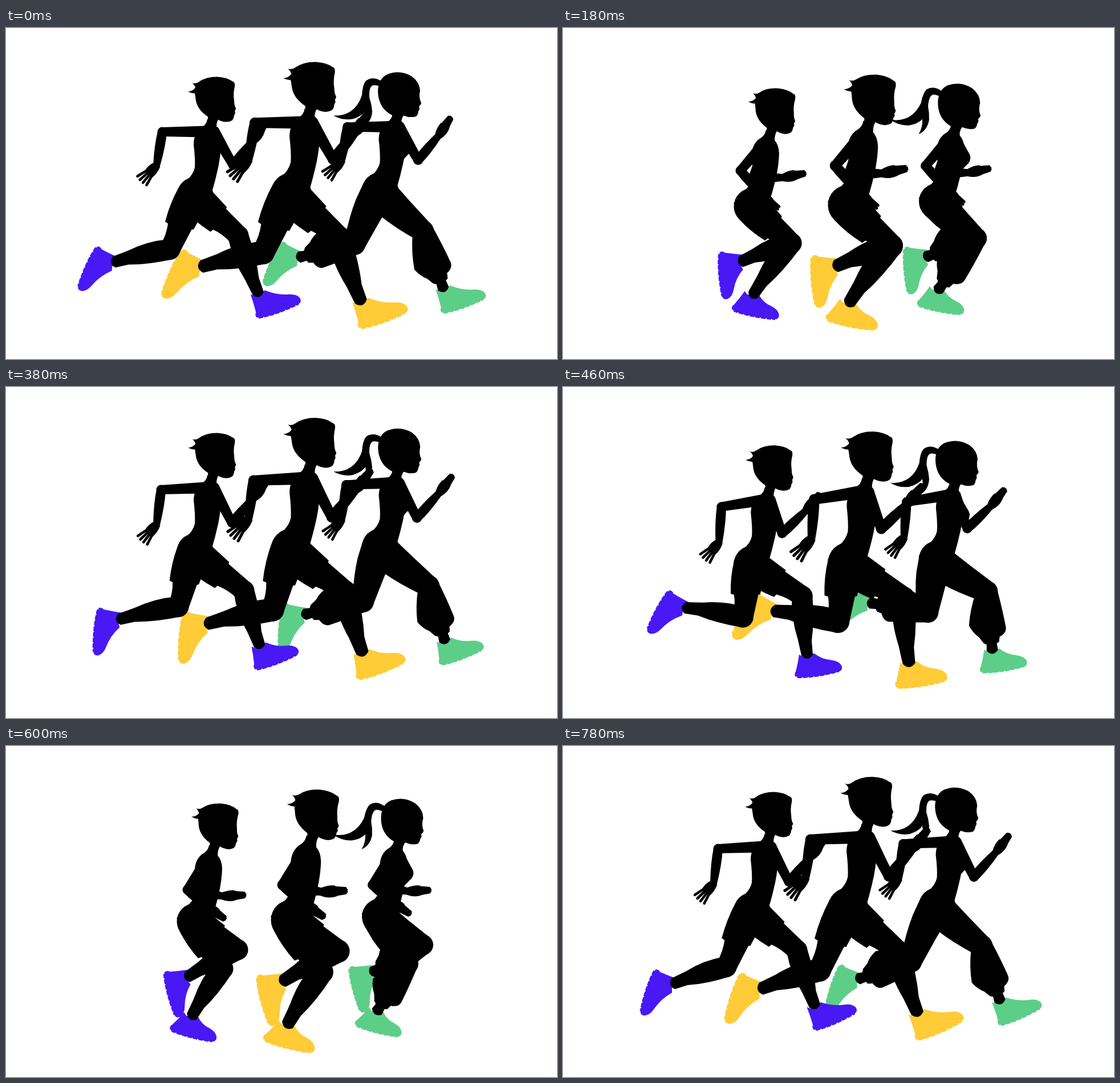
These frames come from a looping animation (966 px wide and 580 px high, 0.8 s). An HTML page with a canvas:

```html
<!DOCTYPE html>
<html lang="en">
<head>
<meta charset="utf-8">
<title>Runners</title>
<style>
html, body { margin: 0; width: 100%; height: 100%; overflow: hidden; background: #fff; }
canvas { display: block; width: 966px; height: 580px; }
</style>
</head>
<body>
<canvas id="stage" width="966" height="580"></canvas>
<script>
const ctx = document.getElementById('stage').getContext('2d');
const LOOP = 800, STEP = 20, TAU = Math.PI * 2;

// time, knee x y, ankle x y, foot angle, sole slide
const legA = [
  [0, 407, 364, 444, 470, -22, 13],
  [120, 418, 372, 402, 478, 0, 0],
  [180, 400, 377, 330, 472, 9, 1],
  [260, 325, 388, 250, 470, 25, 0],
  [380, 302, 385, 194, 408, 93, 12],
  [520, 338, 409, 238, 380, 119, 14],
  [600, 406, 357, 314, 407, 73, 10],
  [660, 413, 343, 384, 443, 26, 4],
  [780, 410, 358, 443, 460, -26, 12]
];
const legB = [
  [0, 287, 388, 185, 411, 112, 14],
  [120, 338, 409, 238, 380, 119, 14],
  [180, 400, 377, 308, 411, 83, 9],
  [260, 413, 343, 384, 443, 26, 4],
  [380, 417, 357, 446, 458, -23, 8],
  [400, 415, 362, 446, 469, -22, 9],
  [520, 418, 372, 402, 478, 0, 0],
  [600, 380, 390, 323, 478, 12, 0],
  [660, 325, 388, 250, 470, 25, 0],
  [780, 286, 387, 189, 418, 106, 13]
];
// time, elbow x y, wrist x y, fingertip x y
const armKeys = [
  [0, 274, 182, 264, 241, 236, 270],
  [120, 285, 237, 291, 300, 274, 331],
  [180, 311, 250, 348, 292, 378, 322],
  [200, 318, 252, 352, 282, 384, 303],
  [260, 352, 240, 412, 249, 452, 248],
  [380, 396, 238, 435, 194, 458, 164],
  [400, 398, 240, 434, 197, 456, 164],
  [520, 366, 270, 414, 238, 441, 217],
  [580, 333, 263, 387, 262, 427, 254],
  [600, 329, 256, 381, 263, 420, 261],
  [660, 290, 217, 327, 260, 358, 286],
  [780, 272, 180, 264, 241, 237, 271]
];

const shape = {
  head: new Path2D('M326 97Q333 99 338 95Q350 86 370 86Q388 87 397 94Q402 95 401 103Q398 115 400 128Q400 136 403 141Q403 144 401 146Q403 150 400 153Q400 158 397 162Q391 166 384 165Q376 164 372 161Q368 167 369 182L350 178Q355 165 354 156Q336 144 333 128Q332 121 331 115Q325 115 319 112Q328 111 332 105Q330 99 326 97Z'),
  girlHead: new Path2D('M652 112Q652 90 668 82Q690 73 711 85Q725 95 726 110Q723 122 728 132Q727 136 724 138Q726 143 723 146Q722 155 717 156Q707 158 697 154Q692 160 693 174L674 170Q679 162 678 154Q653 142 652 112Z'),
  tail: new Path2D('M659 94Q643 84 631 93Q625 100 624 118Q617 140 600 149Q588 155 574 154Q590 163 608 160Q624 155 630 146Q633 160 627 173Q641 165 642 146Q641 134 637 122Q636 104 643 101Q650 100 659 104Z'),
  torso: new Path2D('M353 160Q352 170 341 176Q329 186 329 205Q332 230 331 245Q328 258 316 268Q304 278 299 290L345 310L361 288Q367 268 372 245Q377 220 377 200Q376 185 369 178Q367 170 370 160Z'),
  bust: new Path2D('M369 178Q378 196 386 209Q391 217 385 226Q376 235 371 241L350 235L350 185Z'),
  thigh: new Path2D('M0-27L53-23L54-20L100-18L100 18Q80 16 62 22L61 28Q30 34 0 32Z'),
  pantThigh: new Path2D('M0-27L50-22L100-18L100 20Q60 30 30 32L0 32Z'),
  shin: new Path2D('M0 18Q36 23 75 14L105 10Q117 0 105-10L80-10Q45-18 0-18Z'),
  pantShin: new Path2D('M0 20Q30 33 58 37Q72 31 80 21L91 14L94 9L105 10Q117 0 105-10L93-9L91-13L82-15Q76-29 64-27Q35-24 0-18Z'),
  upperArm: new Path2D('M0-10L100-8Q109-6 109 0Q109 6 100 8L0 10Z'),
  forearm: new Path2D('M0-8Q40-10 100-6L100 6Q40 10 0 8Z'),
  palm: new Path2D('M-3-6Q10-11 21-9L23 8Q10 12-3 6Z')
};

// Smooth periodic curve through keyed rows
function sample(rows, time) {
  const n = rows.length, t = time % LOOP;
  let i = n - 1;
  while (rows[i][0] > t) i--;
  const row = k => rows[(k + n) % n];
  const when = k => row(k)[0] + Math.floor(k / n) * LOOP;
  const t0 = when(i - 1), t1 = when(i), t2 = when(i + 1), t3 = when(i + 2);
  const h = t2 - t1, u = (t - t1) / h, v = 1 - u;
  return row(i).slice(1).map((b, j) => {
    const a = row(i - 1)[j + 1], c = row(i + 1)[j + 1], d = row(i + 2)[j + 1];
    const m1 = (c - a) / (t2 - t0) * h, m2 = (d - b) / (t3 - t1) * h;
    return b * v * v * (1 + 2 * u) + m1 * u * v * v + c * u * u * (3 - 2 * u) - m2 * u * u * v;
  });
}

function local(draw) {
  ctx.save();
  draw();
  ctx.restore();
}

function turn(x, y, angle) {
  ctx.translate(x, y);
  ctx.rotate(angle);
  ctx.translate(-x, -y);
}

function bone(path, x1, y1, x2, y2, size) {
  local(() => {
    ctx.translate(x1, y1);
    ctx.rotate(Math.atan2(y2 - y1, x2 - x1));
    ctx.scale(Math.hypot(x2 - x1, y2 - y1) / size, 1);
    ctx.fill(path);
  });
}

function dot(x, y, r) {
  ctx.beginPath();
  ctx.arc(x, y, r, 0, TAU);
  ctx.fill();
}

function shoe([, , x, y, angle, k], color) {
  const j = k * 0.57;
  local(() => {
    ctx.translate(x, y);
    ctx.rotate(angle * TAU / 360);
    ctx.fillStyle = ctx.strokeStyle = color;
    ctx.beginPath();
    ctx.moveTo(-13, -9);
    ctx.quadraticCurveTo(-20 + k / 2, 5, -29 + k, 17 + j);
    ctx.quadraticCurveTo(-33 + k, 25 + j, -26 + k, 28 + j);
    ctx.quadraticCurveTo(5 + k, 34 + j, 46 + k, 31 + j);
    ctx.quadraticCurveTo(53 + k, 30 + j, 52 + k, 22 + j);
    ctx.quadraticCurveTo(49 + k, 13 + j, 36 + k, 9 + j);
    ctx.quadraticCurveTo(22 + k / 2, 6 + j / 2, 13, -6);
    ctx.lineTo(7, -4);
    ctx.lineTo(-8, -4);
    ctx.fill();
    ctx.lineWidth = 2.5;
    ctx.setLineDash([8, 2]);
    ctx.beginPath();
    ctx.moveTo(-29 + k, 18 + j);
    ctx.quadraticCurveTo(-33 + k, 25 + j, -26 + k, 28 + j);
    ctx.quadraticCurveTo(5 + k, 34 + j, 46 + k, 31 + j);
    ctx.stroke();
  });
}

function leg([kx, ky, ax, ay], hx, hy, girl) {
  bone(girl ? shape.pantThigh : shape.thigh, hx, hy, kx, ky, 100);
  dot(kx, ky, 18.5);
  bone(girl ? shape.pantShin : shape.shin, kx, ky, ax, ay, 110);
}

function arm(time, bob) {
  const [ex, ey, wx, wy, tx, ty] = sample(armKeys, time);
  const sx = 357 + (ex - 335) * 0.12, sy = 182 + bob;
  bone(shape.upperArm, sx, sy, ex, ey, 100);
  dot(sx, sy, 10);
  dot(ex, ey, 8.5);
  bone(shape.forearm, ex, ey, wx, wy, 100);
  // Fingers fan out while the arm is behind the body
  const fan = Math.min(1, Math.max(0, Math.cos(time / LOOP * TAU) * 3));
  local(() => {
    ctx.translate(wx, wy);
    ctx.rotate(Math.atan2(ty - wy, tx - wx));
    ctx.fill(shape.palm);
    ctx.lineWidth = 4.6;
    ctx.lineCap = 'round';
    ctx.beginPath();
    for (let k = -1.5; k < 2; k++) {
      ctx.moveTo(17, k * 4);
      ctx.lineTo(39 - Math.abs(k) * 1.5, k * (2.4 + 5 * fan));
    }
    ctx.stroke();
  });
}

function runner(t, color, girl) {
  const bob = 6.5 + 18.5 * Math.sin((t - 25) / 400 * TAU);
  const lean = (1 - Math.cos((t - 5) / 400 * TAU)) / 2;
  const hx = 331.5, hy = 294 + bob;
  const a = sample(legA, t), b = sample(legB, t);
  shoe(a, color);
  shoe(b, color);
  ctx.fillStyle = ctx.strokeStyle = '#000';
  dot(hx, hy, 32);
  leg(a, hx, hy, girl);
  leg(b, hx, hy, girl);
  arm(t, bob);
  arm(t + 400, bob);
  local(() => {
    ctx.translate(0, bob);
    turn(332, 294, lean * 0.021);
    ctx.fill(shape.torso);
    if (girl) ctx.fill(shape.bust);
    turn(361, 170, lean * 0.036);
    if (!girl) return ctx.fill(shape.head);
    ctx.translate(-324.5, 8.5);
    ctx.fill(shape.girlHead);
    turn(656, 98, lean * 0.08);
    ctx.fill(shape.tail);
  });
}

const team = [
  { color: '#5dce88', x: 324.5, y: -8.5, scale: 1, girl: true },
  { color: '#ffcb36', x: 133.5, y: -35, scale: 1.105 },
  { color: '#4818f5', x: 0, y: 0, scale: 1 }
];

function draw(t) {
  ctx.fillStyle = '#fff';
  ctx.fillRect(0, 0, 966, 580);
  for (const { color, x, y, scale, girl } of team) {
    local(() => {
      ctx.translate(x, y);
      ctx.scale(scale, scale);
      runner(t, color, girl);
    });
  }
}

const start = performance.now();
function tick() {
  const t = Math.max(0, performance.now() - start) % LOOP;
  draw(Math.floor(t / STEP) * STEP);
  requestAnimationFrame(tick);
}
tick();
</script>
</body>
</html>
```
